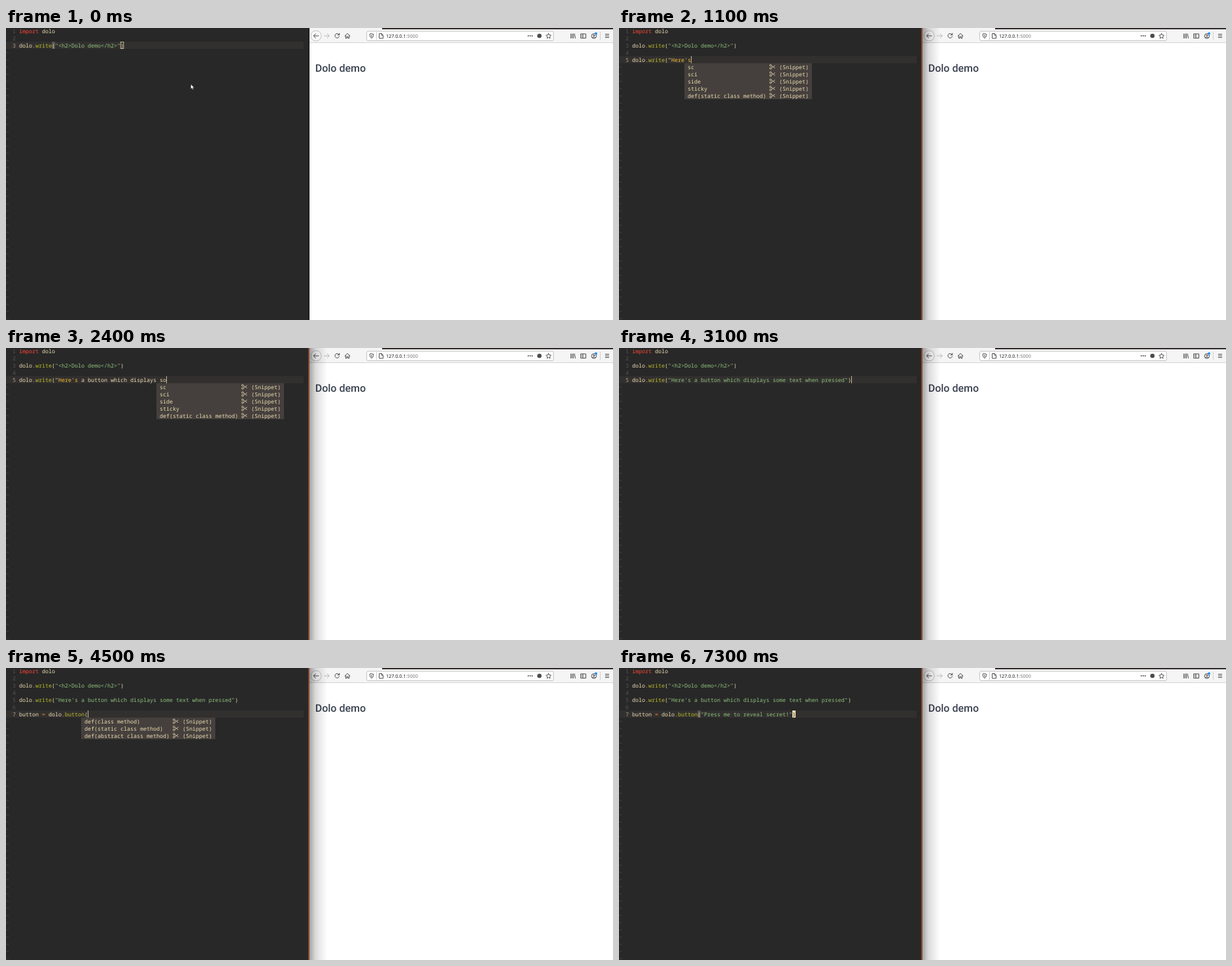
These frames come from a looping animation (928x447 px, 8 s). An HTML page:

```html
<!DOCTYPE html>
<html lang="en">
<head>
<meta charset="utf-8">
<title>Dolo demo</title>
<style>
  html, body { margin: 0; width: 100%; height: 100%; overflow: hidden; background: #fff; }
  svg { display: block; width: 928px; height: 447px; }
  text { white-space: pre; text-rendering: geometricPrecision; }
  #editor { font: 8.3333px "Noto Sans Mono", monospace; }
  .icon { fill: none; stroke: #4a4a4f; stroke-width: 1; stroke-linecap: round; stroke-linejoin: round; }
  .glyph { fill: none; stroke: #ebdbb2; stroke-width: .8; }
</style>
</head>
<body>
<svg viewBox="0 0 928 447">
  <defs>
    <linearGradient id="fade">
      <stop offset="0" stop-opacity=".36"/>
      <stop offset=".35" stop-opacity=".14"/>
      <stop offset="1" stop-opacity="0"/>
    </linearGradient>
  </defs>

  <!-- Browser -->
  <rect x="464" width="464" height="447" fill="#fff"/>
  <rect x="464" width="464" height="22.5" fill="#f5f5f5"/>
  <rect x="575" width="353" height="2" fill="#302c2a"/>
  <rect x="464" y="22" width="464" height="1" fill="#d4d4d4"/>
  <circle cx="474" cy="12" r="8" fill="#fafafa" stroke="#b4b4b4" stroke-width=".8"/>
  <g class="icon">
    <path d="M478 12h-7.5M473.5 8.7l-3.3 3.3 3.3 3.3"/>
    <path d="M486.5 12h7.5M491 8.7l3.3 3.3-3.3 3.3" stroke="#b5b5b7"/>
    <path d="M509 9.8a3.4 3.4 0 1 0 .5 3.2M509.7 8.2v2.5h-2.5"/>
    <path d="M518 12.2l4-3.9 4 3.9M519.3 11.7v4h1.8v-2.5h1.8v2.5h1.8v-4"/>
  </g>
  <rect x="551.5" y="5" width="285.5" height="14.5" rx="2" fill="#fff" stroke="#bcbcbc" stroke-width=".9"/>
  <path d="M566.5 6v12.5M908.5 5.5v13" stroke="#d0d0d0"/>
  <g class="icon" stroke-width=".9">
    <path d="M559 8.6l2.8.9c0 3-.7 4.9-2.8 6.1-2.1-1.2-2.8-3.1-2.8-6.1zM559 10.5v3"/>
    <path d="M571 8.5h3.2l2.3 2.3v5h-5.500zM574 8.700v2.300h2.300"/>
    <path d="M829.500 8.300l1.200 2.500 2.700.400-2 1.900.500 2.700-2.400-1.300-2.400 1.300.500-2.700-2-1.900 2.700-.400z"/>
    <path d="M863.500 9v6.500M865.500 9v6.500M867.500 9v6.500M869 9l1.500 6.500"/>
    <path d="M879 9h7.500v6.500h-7.500zM882 9v6.500M880.300 11h.4M880.300 13h.4"/>
    <circle cx="898.800" cy="12.300" r="3.700"/>
    <circle cx="898.800" cy="11.400" r="1.100"/>
    <path d="M896.500 14.700q2.300-2.200 4.600 0"/>
    <path d="M916.300 9.500h5.400M916.300 12h5.400M916.300 14.500h5.400"/>
  </g>
  <circle cx="902" cy="8.500" r="2" fill="#2b8cf0"/>
  <g fill="#4a4a4f">
    <circle cx="798.500" cy="12" r="1"/><circle cx="801.500" cy="12" r="1"/><circle cx="804.500" cy="12" r="1"/>
    <circle cx="815.500" cy="12" r="3.300"/>
  </g>
  <text x="581" y="14.800" font-family="Noto Sans, sans-serif" font-size="7.200" fill="#1c1c20">127.0.0.1<tspan fill="#77777b">:5000</tspan></text>
  <text x="472.700" y="66.700" font-family="Roboto, sans-serif" font-size="16" font-weight="500" fill="#3b4351">Dolo demo</text>

  <!-- Terminal -->
  <rect width="463" height="447" fill="#282828"/>
  <rect x="462.500" width="1.500" height="447" fill="#1c1b1a"/>
  <g id="focus">
    <rect x="464" width="27" height="447" fill="url(#fade)"/>
    <rect x="462" width="2" height="447" fill="#8c4930"/>
  </g>
  <g id="editor"></g>
  <path id="pointer" d="M0 0v7.500l1.800-1.600 1.300 2.700 1.200-.5-1.200-2.700h2.300z" fill="#fff" stroke="#111" stroke-width=".5"/>
</svg>

<script>
const LOOP = 8000, CELL = 5, ROW = 11, LEFT = 20;
const FG = '#ebdbb2', DIM = '#5a524c', GREY = '#a89984', POPUP = '#45403d';

const CODE = {
  1: 'import dolo',
  3: 'dolo.write("<h2>Dolo demo</h2>")',
  5: 'dolo.write("Here\'s a button which displays some text when pressed")',
  7: 'button = dolo.button("Press me to reveal secret!")'
};

const items = (names, kind = 'cube', menu = 'LSP') => names.split(',').map(name => [name, kind, menu]);
const snippets = names => items(names, 'scissors', 'Snippet');

// Completion lists: label width in characters, entries, optional scrollbar.
const LISTS = {
  d: { width: 36, scroll: true, entries: [...items('dolo,dict,dir,divmod,delattr,DeprecationWarning'),
       ...snippets('def,defs,def(class method),def(static class method)')] },
  w: { width: 24, entries: [...items('write', 'fn'), ...snippets('while,with,while/else,with open')] },
  s: { width: 24, entries: snippets('sc,sci,side,sticky,def(static class method)') },
  s5: { width: 28, entries: snippets('sc,sci,side,sticky,def(static class method)') },
  s6: { width: 28, entries: snippets('sc,sci,side,sticky,some,def(static class method)') },
  b: { width: 42, scroll: true, entries: items('button,bool,bytes,bytearray,bin,breakpoint,BaseException,BlockingIOError,BrokenPipeError,BufferError') },
  butt: { width: 25, scroll: true, entries: [['button', 'fn', 'LSP'], ['Button', 'tree', 'LSP'],
       ['BuiltinMethodType', 'cube', 'LSP'], ['BuiltinFunctionType', 'tree', 'LSP'],
       ['button', 'scissors', 'Snippet'], ['button', 'text', 'Buffer'],
       ...items('builtin_module_names,busday_count,busday_offset'), ['builtins', 'braces', 'LSP']] },
  def: { width: 26, entries: snippets('def(class method),def(static class method),def(abstract class method)') },
  re: { width: 31, entries: snippets('ret,return,property(read only)') }
};

// Time, line being typed, characters typed, completion list, column of the completed word.
const STEPS = [
  [0, 3, 32], [400, 5, 0], [500, 5, 2, 'd', 0], [600, 5, 4], [800, 5, 5], [900, 5, 6, 'w', 5],
  [1000, 5, 14], [1100, 5, 18, 's', 17], [1200, 5, 18, 's5', 17], [1500, 5, 19],
  [1700, 5, 20], [1800, 5, 23], [1900, 5, 27], [2000, 5, 31], [2100, 5, 35], [2200, 5, 39],
  [2300, 5, 43], [2400, 5, 45, 's', 43], [2500, 5, 46, 's6', 43],
  [2600, 5, 49], [2700, 5, 53], [2800, 5, 56], [2900, 5, 60], [3000, 5, 65], [3100, 5, 67],
  [3300, 7, 0], [3600, 7, 1, 'b', 0], [3700, 7, 3, 'butt', 0], [3800, 7, 4, 'butt', 0], [3900, 7, 9],
  [4100, 7, 10, 'd', 9], [4200, 7, 13], [4300, 7, 14], [4400, 7, 18], [4500, 7, 21, 'def', 20],
  [5100, 7, 22], [5200, 7, 24], [5400, 7, 27], [5500, 7, 30], [5600, 7, 34],
  [6000, 7, 36], [6100, 7, 37, 're', 34], [6200, 7, 40], [6300, 7, 44], [6400, 7, 48], [7000, 7, 50]
];

// Start, end and height of each appearance of the mouse pointer.
const POINTER = [[0, 100, 86], [3400, 4100, 97], [5600, 6000, 98], [6400, 7000, 97]];

const el = id => document.getElementById(id);
const top_ = row => ROW * row - 12;
const rect = (x, y, w, h, fill) => `<rect x="${x}" y="${y}" width="${w}" height="${h}" fill="${fill}"/>`;
const text = (x, row, str, fill = FG) =>
  `<text x="${x}" y="${top_(row) + 9}" fill="${fill}">${str.replace(/&/g, '&amp;').replace(/</g, '&lt;')}</text>`;

function tokenColour(token, next) {
  if (token === 'import') return '#fb4934';
  if (token === '.') return GREY;
  if (token === '=') return '#fe8019';
  if (/^".*"$/.test(token)) return '#8ec07c';
  if (/^\w/.test(token) && next === '(') return '#b8bb26';
  return /^[A-Z]/.test(token) ? '#fabd2f' : FG;
}

function codeLine(row, str) {
  return [...str.matchAll(/"[^"]*"|\w+('\w*)?|\S/g)].map(({ 0: token, index }) =>
    text(LEFT + index * CELL, row, token, tokenColour(token, str[index + token.length]))).join('');
}

const GLYPHS = {
  scissors: '<path d="M3 3.800l5.500 3.700M3 7.200l5.500-3.700"/><circle cx="1.700" cy="3.200" r="1.300"/><circle cx="1.700" cy="7.800" r="1.300"/>',
  cube: '<path d="M3.500 2.200l3.200 1.600v3.800l-3.200 1.700-3.200-1.700v-3.800zM.3 3.800l3.200 1.600 3.200-1.600M3.500 5.400v3.900"/>',
  tree: '<path d="M2.400 2.300h2.200v2h-2.200zM.4 7h2v2h-2zM4.800 7h2v2h-2zM3.500 4.300v1.300M1.400 7v-1.400h4.400v1.400"/>',
  text: '<path d="M2.500 3.200h4.800M5 3.200v5.500M0 5h3.200M1.600 5v3.700"/>'
};

function glyph(kind, x, row) {
  if (kind === 'fn') return text(x + 1, row, 'ƒ');
  if (kind === 'braces') return `<g font-size="6.500">${text(x, row, '{}')}</g>`;
  return `<g class="glyph" transform="translate(${x} ${top_(row)})">${GLYPHS[kind]}</g>`;
}

function popup({ width, entries, scroll }, row, column) {
  const x = LEFT + (column - 1) * CELL, y = top_(row + 1);
  const iconX = x + (width + 2) * CELL, fullWidth = (width + (scroll ? 17 : 15)) * CELL;
  let out = rect(x, y, fullWidth, entries.length * ROW, POPUP);
  if (scroll) out += rect(x + fullWidth - CELL, y, CELL, 6 * ROW, '#7c6f64');
  entries.forEach(([label, kind, menu], i) => {
    const r = row + 1 + i;
    out += text(x + CELL, r, label) + glyph(kind, iconX, r) + text(iconX + 3 * CELL, r, `(${menu})`);
  });
  return out;
}

// Normal-mode cursor on the closing bracket, with its partner highlighted.
function bracketCursor(row, focused) {
  const str = CODE[row], y = top_(row);
  const openX = LEFT + str.indexOf('(') * CELL, closeX = LEFT + (str.length - 1) * CELL;
  const cursor = focused
    ? rect(closeX, y, CELL, ROW, FG) + text(closeX, row, ')', '#282828')
    : `<rect x="${closeX + .2}" y="${y + .5}" width="4.600" height="10" fill="none" stroke="${FG}" stroke-width=".8"/>`;
  return rect(openX, y, CELL, ROW, '#5a524c') + text(openX, row, '(') + cursor;
}

function editor([, row, typed, list, column], focused, normal) {
  let out = rect(0, top_(row), 455, ROW, '#32302f');
  for (let r = 1; r <= 41; r++) {
    if (r > row) { out += text(0, r, '~', DIM); continue; }
    out += text(10, r, String(r), r === row ? GREY : DIM);
    if (CODE[r]) out += codeLine(r, r === row ? CODE[r].slice(0, typed) : CODE[r]);
  }
  if (list) out += popup(LISTS[list], row, column);
  return out + (normal ? bracketCursor(row, focused) : rect(LEFT + typed * CELL, top_(row), .8, ROW, FG));
}

let shown;
function draw() {
  const t = performance.now() % LOOP;
  const step = STEPS.findLast(s => s[0] <= t);
  const focused = t >= 100, normal = t < 400 || t >= 7300;
  const key = [step, focused, normal].join();
  if (key !== shown) {
    el('editor').innerHTML = editor(step, focused, normal);
    el('focus').style.display = focused ? '' : 'none';
    shown = key;
  }
  const spot = POINTER.find(([from, to]) => t >= from && t < to);
  el('pointer').style.display = spot ? '' : 'none';
  if (spot) el('pointer').setAttribute('transform', `translate(${spot[2] < 90 ? 282.500 : 281.500} ${spot[2]})`);
  requestAnimationFrame(draw);
}
draw();
</script>
</body>
</html>
```
